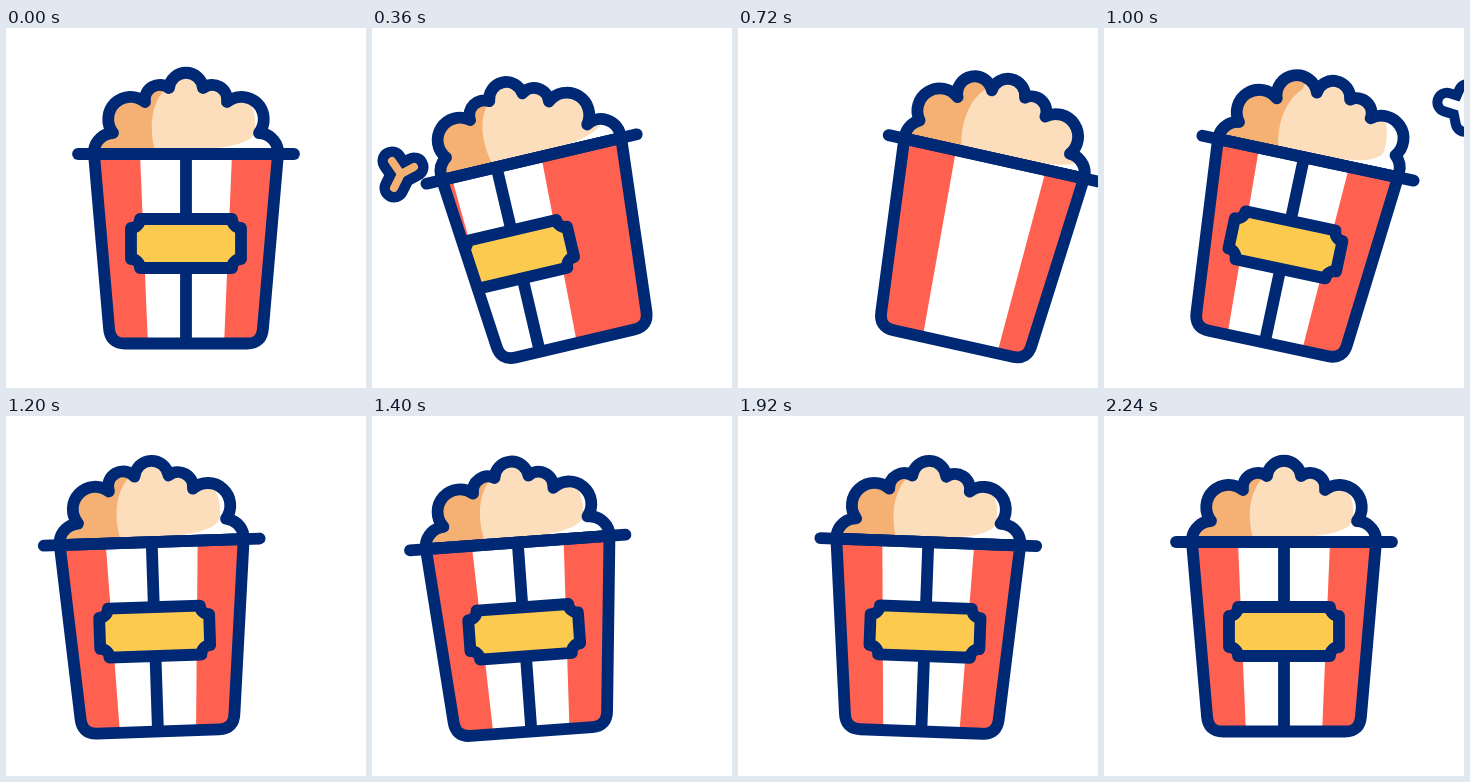
These frames come from a looping animation (360 px wide and 360 px high, 2560 ms). An HTML page:

```html
<!DOCTYPE html>
<html lang="en">
<head>
<meta charset="utf-8">
<title>Popcorn bucket</title>
<style>
  html, body { margin: 0; width: 100%; height: 100%; overflow: hidden; background: #fff; }
  svg { display: block; width: 100vw; height: 100vh; }
  .line { fill: none; stroke: #002975; stroke-width: 11.8; stroke-linecap: round; stroke-linejoin: round; }
  .kernel path { fill: none; stroke-linecap: round; stroke-linejoin: round; }
</style>
</head>
<body>
<svg viewBox="0 0 360 360">
  <defs>
    <path id="body" d="M-92 126L-77 300Q-76 315.5 -61 315.5H61Q76 315.5 77 300L92 126Z"/>
    <path id="panel" d="M-46 126H46L38 318H-38Z" fill="#fff"/>
    <path id="kernelShape" d="M-9 -13L0 0L13 -7M0 0L-7 14"/>
    <path id="puff"/>
    <clipPath id="bodyClip"><use href="#body"/></clipPath>
    <clipPath id="puffClip"><use href="#puff"/></clipPath>
  </defs>

  <g id="leftKernel" class="kernel">
    <use href="#kernelShape" fill="none" stroke="#002975" stroke-width="29" stroke-linecap="round" stroke-linejoin="round"/>
    <use href="#kernelShape" fill="none" stroke="#f5b073" stroke-width="8" stroke-linecap="round" stroke-linejoin="round"/>
  </g>
  <g id="rightKernel" class="kernel">
    <use href="#kernelShape" fill="none" stroke="#002975" stroke-width="29" stroke-linecap="round" stroke-linejoin="round"/>
    <use href="#kernelShape" fill="none" stroke="#fff" stroke-width="9" stroke-linecap="round" stroke-linejoin="round"/>
  </g>

  <g id="bucket">
    <g clip-path="url(#puffClip)">
      <rect x="-110" y="30" width="220" height="100" fill="#fff"/>
      <rect x="-110" y="30" width="130" height="100" fill="#f5b073"/>
      <path id="light" fill="#fcdebd"/>
    </g>
    <use href="#puff" class="line"/>

    <g clip-path="url(#bodyClip)">
      <rect x="-100" y="120" width="200" height="200" fill="#ff6150"/>
      <g id="wrap">
        <use href="#panel" x="-184"/>
        <use href="#panel" x="184"/>
        <use href="#panel"/>
        <path class="line" d="M0 126V316"/>
        <path class="line" style="fill:#fdca50"
          d="M-46 191H46A9 9 0 0 0 55 200V231A9 9 0 0 0 46 240H-46A9 9 0 0 0 -55 231V200A9 9 0 0 0 -46 191Z"/>
      </g>
    </g>
    <use href="#body" class="line"/>
    <path class="line" d="M-108 126H108"/>
  </g>
</svg>
<script>
const LOOP = 2560, STEP = 40;
const el = id => document.getElementById(id);

// Each track is a list of [ms, value].
const tracks = {
  tilt:  [[0, 0], [360, -13.2], [720, 12.5], [840, 16], [1000, 12], [1200, -1.9], [1320, -4.5], [1600, -1.6], [1800, 2.6], [2240, 0]],
  slide: [[0, 0], [360, 23], [720, 35], [1000, -15.5], [1200, -28], [1320, -26], [1600, -1], [1800, 4], [2240, 0]],
  spin:  [[0, 0], [200, -7], [360, -36], [720, -177], [780, -177], [1000, -4], [1080, 0]],
  left:  [[0, 0], [360, -10], [720, -8], [1000, -2], [1200, 0]],
  right: [[0, 0], [360, -11], [720, 0], [1000, 12], [1200, 2], [1600, -3], [2240, 0]],
  shade: [[0, 0], [360, -8], [720, -3], [1000, 0], [1200, 0], [1600, -3], [2240, 0]],
  gloss: [[0, 0], [360, 16], [720, 24], [1000, 4], [1200, 0]],
  lx: [[200, 105], [360, 29], [560, -6], [660, -16]],
  ly: [[200, 105], [360, 146], [560, 316], [660, 440]],
  rx: [[840, 296], [1000, 358], [1080, 394]],
  ry: [[840, 95], [1000, 79], [1080, 92]]
};

// Smooth curve through the keys, flat at turning points and ends.
function value(name, t) {
  const k = tracks[name], last = k.length - 1;
  if (t <= k[0][0]) return k[0][1];
  if (t >= k[last][0]) return k[last][1];
  const i = k.findIndex(p => p[0] > t) - 1;
  const rate = n => (k[n + 1][1] - k[n][1]) / (k[n + 1][0] - k[n][0]);
  const slope = n => {
    if (n === 0 || n === last) return 0;
    const a = rate(n - 1), b = rate(n);
    return a * b <= 0 ? 0 : 2 * a * b / (a + b);
  };
  const d = k[i + 1][0] - k[i][0], u = (t - k[i][0]) / d, v = 1 - u;
  return v * v * (1 + 2 * u) * k[i][1] + u * u * (3 - 2 * u) * k[i + 1][1]
    + d * u * v * (v * slope(i) - u * slope(i + 1));
}

function puffPath(l, r) {
  const arc = (rad, x, y) => `A${rad} ${rad} 0 0 1 ${x} ${y}`;
  return "M-92 126V122" + arc(20, -73 + l, 105) + arc(22.4, -41 + l, 74)
    + arc(15, -17 + r, 60) + arc(17.1, 17 + r, 60) + arc(15, 41 + r, 74)
    + arc(22.4, 73 + r, 105) + arc(20, 92, 122) + "V126Z";
}

function lightPath(x, g) {
  return `M${x - 12} 30L${x - 20} 60C${x - 38} 78 ${x - 36} 108 ${x - 30} 126H${x + 30 + g}V120`
    + `Q${x + 66 + g} 116 ${x + 69 + g} 104Q${x + 71 + g} 85 ${x + 62 + g} 70V30Z`;
}

function toss(id, x, y, angle, shown) {
  el(id).setAttribute("visibility", shown ? "visible" : "hidden");
  el(id).setAttribute("transform", `translate(${x} ${y}) rotate(${angle})`);
}

function draw(t) {
  const at = name => value(name, t);
  el("bucket").setAttribute("transform",
    `translate(${180 + at("slide")} 316) rotate(${at("tilt")}) translate(0 -316)`);
  el("wrap").setAttribute("transform", `translate(${at("spin")} 0)`);
  el("puff").setAttribute("d", puffPath(at("left"), at("right")));
  el("light").setAttribute("d", lightPath(at("shade"), at("gloss")));
  toss("leftKernel", at("lx"), at("ly"), (360 - t) * 0.25, t > 200 && t < 660);
  toss("rightKernel", at("rx"), at("ry"), (t - 1000) * 0.25 - 38, t > 840 && t < 1080);
}

function tick() {
  const t = performance.now() % LOOP;
  draw(Math.floor(t / STEP) * STEP);
  requestAnimationFrame(tick);
}
tick();
</script>
</body>
</html>
```
